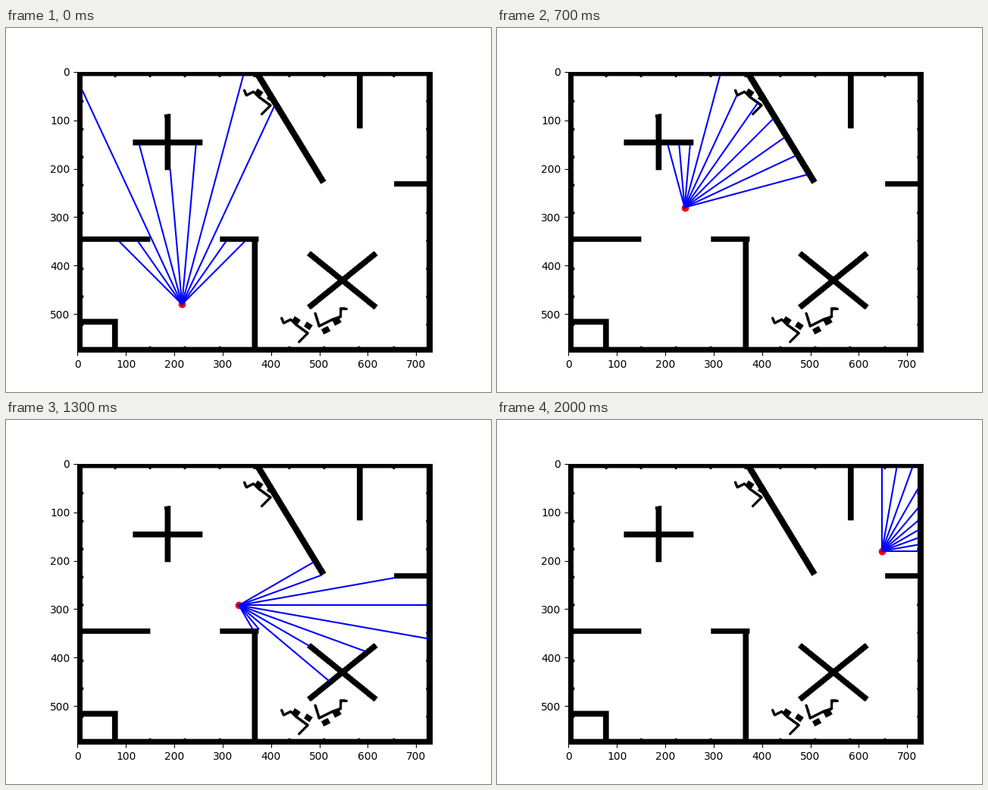
Animation, 640 px wide and 480 px high, one loop 2100 ms. Source, as a matplotlib script:

```python
import numpy as np
import matplotlib.pyplot as plt
from matplotlib.animation import FuncAnimation

W, H = 733, 579
FRAMES = 21
CELL = np.array([7.2, 12.0])

yy, xx = np.mgrid[0:H, 0:W]
wall = np.zeros((H, W), bool)


def bar(a, b, w=12, rounded=False):
    """Mark a thick straight wall from a to b, with flat or round ends."""
    (x0, y0), (x1, y1) = a, b
    length = np.hypot(x1 - x0, y1 - y0)
    angle = np.arctan2(y1 - y0, x1 - x0)
    ux, uy = np.cos(angle), np.sin(angle)
    along = (xx - x0) * ux + (yy - y0) * uy
    across = (yy - y0) * ux - (xx - x0) * uy
    over = along - np.clip(along, 0, length)
    if rounded:
        hit = np.hypot(over, across) <= w / 2
    else:
        hit = (over == 0) & (abs(across) <= w / 2)
    wall[hit] = True


def level(x0, x1, y, w=11):
    bar((x0, y), (x1, y), w)


def upright(x, y0, y1):
    bar((x, y0), (x, y1))


def border():
    """Frame the room, with a small bump at every tenth of each side."""
    inside = (xx > 10) & (xx < 722) & (yy > 9) & (yy < 569)
    wall[~inside] = True
    for i in range(1, 10):
        x, y = 6 + 72 * i, 4 + 57.6 * i
        for p in ((x, 9), (x, 570), (10, y), (723, y)):
            bar(p, p, 6, rounded=True)


def scribble(x, y, turn=0, size=1.0):
    """Draw a bent line with two blocks on its back."""
    a = np.radians(turn)
    spin = size * np.array([[np.cos(a), np.sin(a)], [-np.sin(a), np.cos(a)]])

    def place(points):
        return np.array(points) @ spin + (x, y)

    line = place([(0, 0), (4, 10), (19, 3), (29, 13), (54, 31), (36, 49)])
    for p, q in zip(line, line[1:]):
        bar(p, q, 5.5, rounded=True)
    for bx, by in ((30, 5), (55, 16)):
        bar(*place([(bx - 6, by - 4), (bx + 6, by + 4)]))


border()

# Cross, lower left room, corner box
upright(186, 88, 203)
level(115, 258, 146.5)
level(0, 150, 346)
level(295, 374, 346)
upright(366, 342, H)
level(0, 83, 516.5)
upright(77.5, 512, H)

# Slanted wall, right hand stubs, diagonal cross
bar((369, 0), (508.5, 229), 13)
upright(583.5, 0, 117)
level(655, W, 232)
bar((478, 375), (617, 487))
bar((478, 487), (617, 375))

scribble(345, 39)
scribble(422, 509)
scribble(556, 490, turn=118, size=1.07)

# Way points by step: cell x, cell y, heading in degrees
route = {
    0: (30, 40, -90),
    6: (30, 25, -90),
    9: (40, 20, 0),
    11: (42, 22, 45),
    12: (43, 23, 30),
    15: (53, 27, -15),
    18: (75, 19.5, -35),
    20: (90, 15, -45),
}
beams = np.arange(-45, 46, 10)
reach = np.arange(0, 940, 0.5)


def pose(i):
    cx, cy, heading = (np.interp(i, list(route), track)
                       for track in zip(*route.values()))
    return *(CELL * (cx, cy)), heading


def cast(x, y, angle):
    """Return the first wall point met from (x, y)."""
    a = np.radians(angle)
    px, py = x + reach * np.cos(a), y + reach * np.sin(a)
    cols = np.clip(np.rint(px).astype(int), 0, W - 1)
    rows = np.clip(np.rint(py).astype(int), 0, H - 1)
    k = np.argmax(wall[rows, cols])
    return px[k], py[k]


fig, ax = plt.subplots(figsize=(6.4, 4.8), dpi=100)
ax.imshow(np.where(wall, 0, 255), cmap="gray", vmin=0, vmax=255)
ax.set_autoscale_on(False)
robot, = ax.plot([], [], "ro")
rays = [ax.plot([], [], "b")[0] for _ in beams]


def draw(i):
    x, y, heading = pose(i)
    robot.set_data([x], [y])
    for ray, offset in zip(rays, beams):
        ex, ey = cast(x, y, heading + offset)
        ray.set_data([x, ex], [y, ey])
    return [robot, *rays]


anim = FuncAnimation(fig, draw, frames=FRAMES, interval=100, repeat=True)
plt.show()
```
